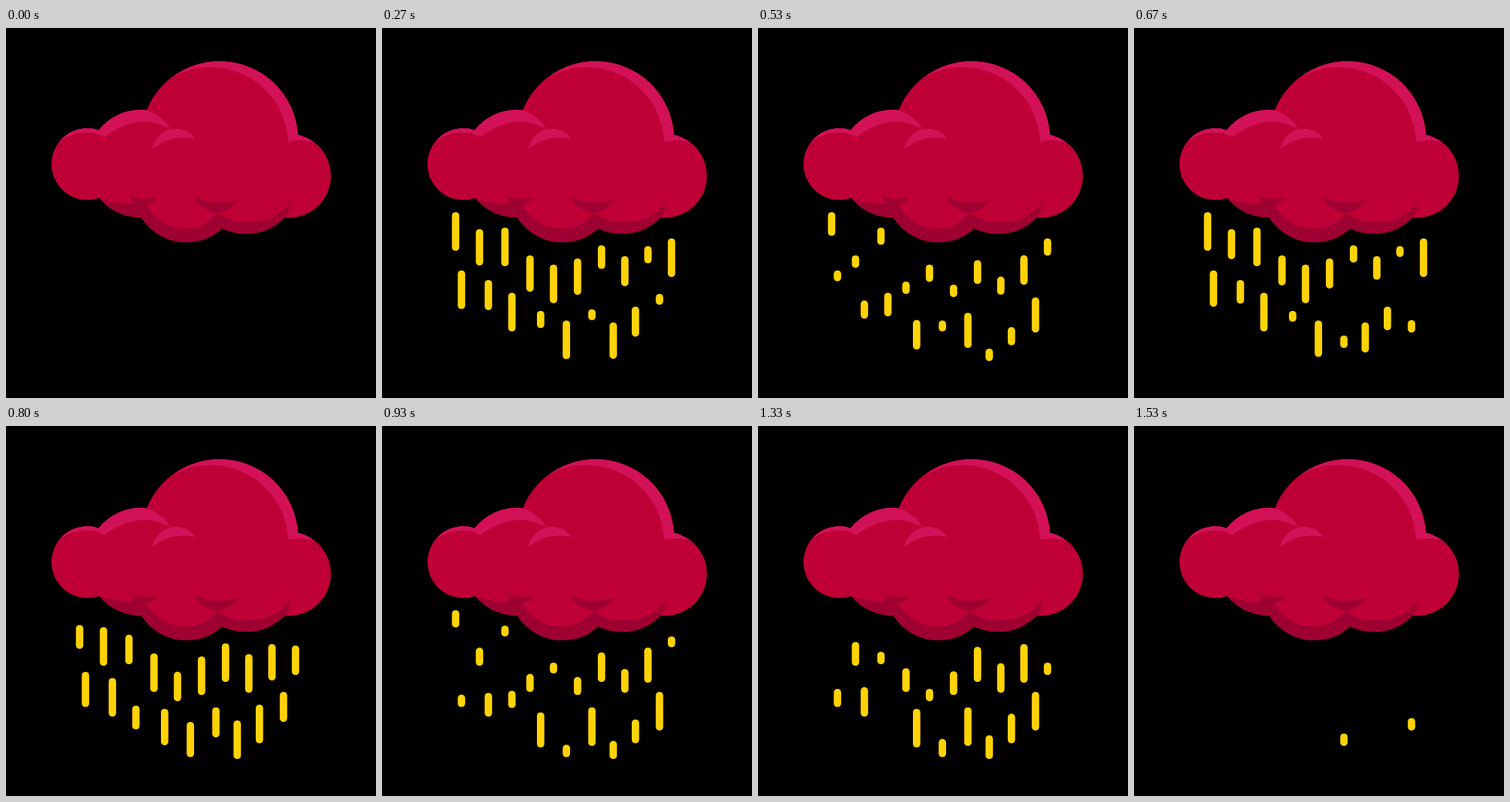
Animation, 480 px wide and 480 px high, one loop 1.59 s. Source, as an HTML page without scripts:

```html
<!DOCTYPE html>
<html lang="en">
<head>
<meta charset="utf-8">
<title>Rain cloud</title>
<style>
  /* Clock in half frames; 24 drawn frames per loop */
  @property --tick { syntax: "<number>"; inherits: true; initial-value: 0; }
  /* Integer type rounds, giving the number of the current fall */
  @property --cycle { syntax: "<integer>"; inherits: true; initial-value: 0; }

  html, body { margin: 0; width: 100%; height: 100%; overflow: hidden; background: #000; }
  svg { display: block; width: 100%; height: 100%; }

  .rain { fill: #fdd306; animation: clock 1590ms steps(24) -3ms infinite; }
  @keyframes clock { from { --tick: 0; } to { --tick: 48; } }

  /* Each drop falls three times, 13 ticks per fall, starting at --start */
  .rain g {
    --age: calc(var(--tick) - var(--start));
    --cycle: calc((var(--age) - 6) / 13);
    --phase: calc(var(--age) - 13 * var(--cycle));
    opacity: calc((var(--cycle) + 1) * (3 - var(--cycle)));
  }
  /* Grow from the top, hold, then shrink towards the bottom */
  .rain rect {
    width: 9.6px;
    rx: 4.6px;
    height: calc(1px * min(50, 14 + 8.3 * var(--phase), 104.8 - 7.4 * var(--phase)));
    transform: translateY(calc(1px * max(0, 7.4 * var(--phase) - 54.8)));
  }
</style>
</head>
<body>
<svg viewBox="0 0 480 480">
  <defs>
    <clipPath id="cloud">
      <circle cx="105.5" cy="176.5" r="46.5"/>
      <circle cx="175" cy="176" r="70"/>
      <circle cx="277" cy="145" r="102"/>
      <circle cx="367" cy="191.7" r="54.5"/>
      <circle cx="234" cy="208.8" r="69.2"/>
      <circle cx="311" cy="196" r="71"/>
    </clipPath>
  </defs>

  <g clip-path="url(#cloud)">
    <rect x="50" y="30" width="380" height="260" fill="#bf0037"/>
    <g fill="#d21157">
      <path d="M215 64A102 102 0 0 1 379 139L366 148A101 101 0 0 0 215 64Z"/>
      <path d="M377 137Q392 136 404 150Q386 143 366 148Z"/>
      <path d="M70 146A46.5 46.5 0 0 1 122 132L128 141Q100 128 70 146Z"/>
      <path d="M120 133A53 53 0 0 1 213 131Q172 108 127 142Z"/>
      <path d="M190 157A31 31 0 0 1 246 144Q214 137 190 157Z"/>
    </g>
    <path fill="#9f0032" d="M118 219Q140 230 168 227Q163 223 159 216Q178 226 198 219Q192 227 182 230
      Q200 260 234 260Q258 260 274 240Q252 236 244 219Q272 232 301 223Q294 236 274 240
      Q292 252 311 252Q352 252 368 226Q368 238 362 246V290H120Z"/>
  </g>

  <g class="rain">
    <g style="--start:1"><rect x="90.7" y="239"/><rect x="163.7" y="343.5"/></g>
    <g style="--start:2"><rect x="154.7" y="259"/><rect x="217.7" y="307"/><rect x="370.8" y="273"/></g>
    <g style="--start:3"><rect x="98.3" y="314.5"/><rect x="234.4" y="379.5"/></g>
    <g style="--start:4">
      <rect x="121.7" y="261"/><rect x="187.2" y="295"/><rect x="248.9" y="299"/><rect x="295.2" y="382"/>
    </g>
    <g style="--start:5"><rect x="310.2" y="296"/><rect x="133.2" y="327"/><rect x="324" y="361.5"/></g>
    <g style="--start:6"><rect x="280" y="282"/></g>
    <g style="--start:7"><rect x="340.2" y="283"/><rect x="201" y="367"/></g>
    <g style="--start:8"><rect x="267.5" y="365"/><rect x="355.2" y="345"/></g>
  </g>
</svg>
</body>
</html>
```
